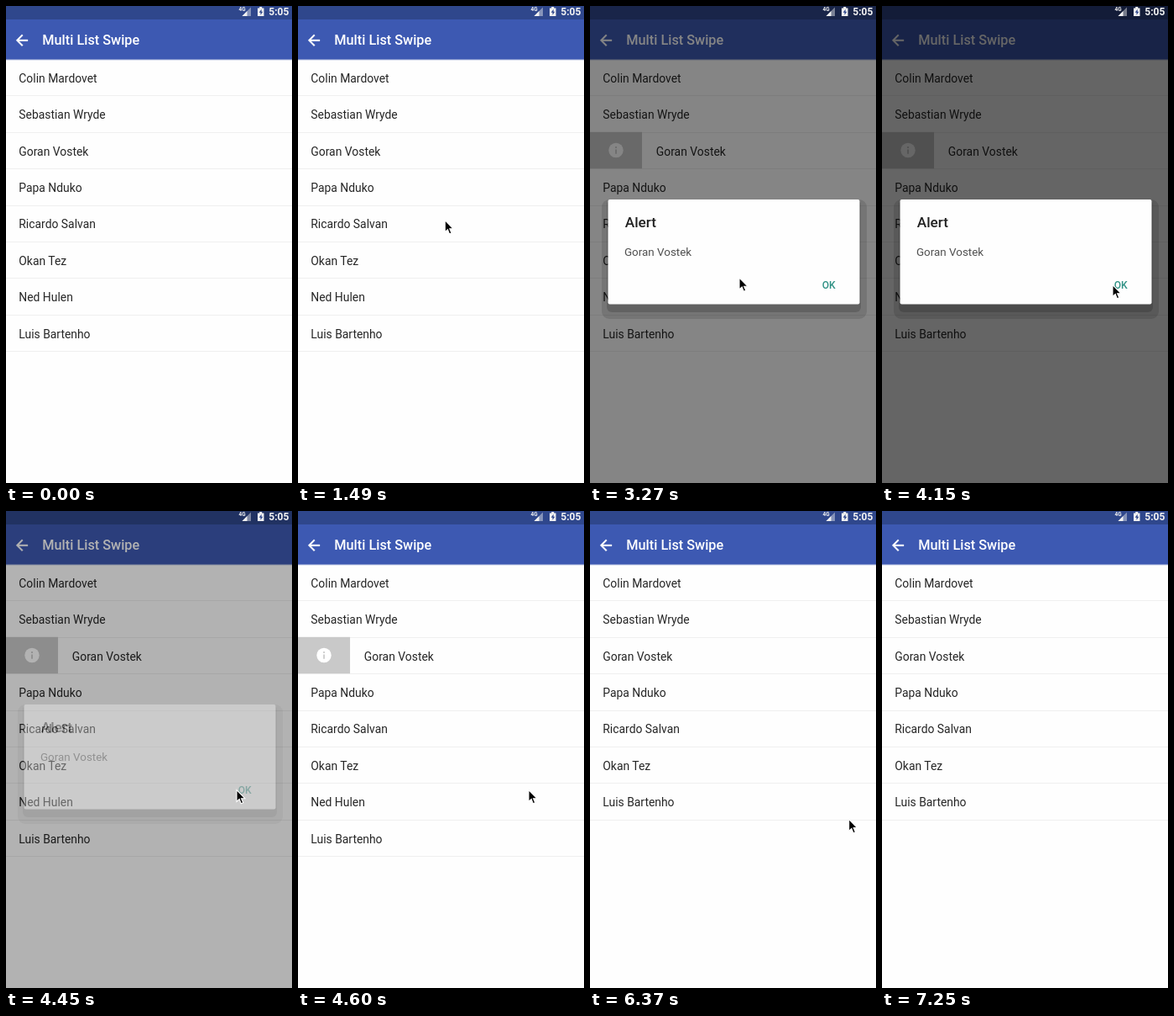
These frames come from a looping animation (341x567 px, 7.37 s). An HTML page:

```html
<!DOCTYPE html>
<html lang="en">
<head>
<meta charset="utf-8">
<title>Multi List Swipe</title>
<style>
html, body { margin: 0; width: 100%; height: 100%; overflow: hidden; background: #fefefe; }
svg { display: block; width: 341px; height: 567px; font-family: Roboto, "Noto Sans", sans-serif; }
.row { font-size: 13.9px; fill: #262626; }
.medium { font-weight: 500; }
.bold { font-weight: 700; }
</style>
</head>
<body>
<svg viewBox="0 0 341 567">
  <defs>
    <linearGradient id="fall" x2="0" y2="1">
      <stop stop-color="#3d59b2" stop-opacity=".4"/>
      <stop offset="1" stop-color="#3d59b2" stop-opacity="0"/>
    </linearGradient>
  </defs>
  <rect width="341" height="567" fill="#fefefe"/>
  <g id="list"></g>
  <rect y="63" width="341" height="2.5" fill="url(#fall)"/>
  <rect y="16" width="341" height="47.5" fill="#3d59b2"/>
  <rect width="341" height="16" fill="#2f478c"/>
  <path fill="#fff" stroke="#fff" stroke-width=".4" transform="translate(8.6 30.4) scale(.868)"
    d="M20 11H7.83l5.59-5.59L12 4l-8 8 8 8 1.41-1.41L7.83 13H20z"/>
  <text class="medium" x="43.3" y="46.3" font-size="16.3" fill="#fff">Multi List Swipe</text>
  <rect id="dim" width="341" height="567"/>
  <g fill="#f2f2f2">
    <text class="bold" x="277.5" y="6.3" font-size="6.4">4G</text>
    <path d="M281.5 12L292 1.5V12z" opacity=".45"/>
    <path d="M281.5 12l6-6v6z"/>
    <path d="M300 2.5h2.2V1h3v1.5h2.3V12H300z"/>
    <path d="M304.6 3.8l-2.9 4h1.8v3l2.8-4h-1.7z" fill="#2f478c"/>
    <text class="bold" x="313.3" y="11" font-size="12">5:05</text>
  </g>
  <g id="dialog">
    <rect x="14" y="230" width="316" height="142" rx="9" opacity=".12"/>
    <rect x="20" y="230" width="303" height="134" rx="6" opacity=".16"/>
    <rect x="21.5" y="230" width="300" height="124.5" rx="2" fill="#fefefe"/>
    <text class="medium" x="41.7" y="263" font-size="17.2" fill="#222">Alert</text>
    <text id="message" x="41" y="297" font-size="13.4" fill="#505050"></text>
    <text class="medium" x="276.7" y="335.8" font-size="12.1" fill="#2f9184">OK</text>
  </g>
  <path id="cursor" d="M0 0v14l3.2-3 2.1 5.3 2.5-1-2.2-5.1h4.3z" stroke="#fff" stroke-width="1.1"/>
</svg>
<script>
const LOOP = 7370, START = 1337, STEP = 147.75, LAST_STEP = 40;
const WIDTH = 341, ROW_TOP = 63, ROW_H = 43.4, OPEN = 63.5;
const INFO = 2, TRASH = 6;

// Moments of the interaction, counted in steps
const DRAG_INFO = 5, TAP_INFO = 11, TAP_OK = 20, DRAG_TRASH = 26, TAP_TRASH = 33;

const names = ["Colin Mardovet", "Sebastian Wryde", "Goran Vostek", "Papa Nduko",
  "Ricardo Salvan", "Okan Tez", "Ned Hulen", "Luis Bartenho"];

const $ = id => document.getElementById(id);
const ramp = (t, from, length) => Math.min(1, Math.max(0, (t - from) / length));
const easeOut = p => p * (2 - p);
const spring = t => t < 0 ? 1 : Math.exp(-1.5 * t) * Math.cos(1.2 * t);
const rowY = i => ROW_TOP + i * ROW_H;
const rowMid = i => rowY(i + .5);

const waypoints = [
  { at: 0, x: 296, y: 343 },
  { at: DRAG_INFO - 1, x: 20, y: 141 },
  { at: DRAG_INFO, x: 12, y: 165 },
  { at: DRAG_INFO + 3, x: 70, y: rowMid(INFO) },
  { at: TAP_INFO, x: 31, y: rowMid(INFO) },
  { at: TAP_INFO + 2, x: 178, y: 323 },
  { at: TAP_OK - 1, x: 275, y: 331.5 },
  { at: TAP_OK + 2, x: 275, y: 331.5 },
  { at: DRAG_TRASH, x: 325, y: rowMid(TRASH) },
  { at: DRAG_TRASH + 2, x: 278, y: 342 },
  { at: DRAG_TRASH + 4, x: 312, y: 342 },
  { at: TAP_TRASH, x: 312, y: 342 },
  { at: TAP_TRASH + 3, x: 306, y: 386 },
  { at: LAST_STEP, x: 328, y: 580 }
];

function cursorAt(step) {
  const next = Math.max(1, waypoints.findIndex(point => point.at > step));
  const a = waypoints[next - 1], b = waypoints[next];
  const p = easeOut(ramp(step, a.at, b.at - a.at));
  return [a.x + (b.x - a.x) * p, a.y + (b.y - a.y) * p];
}

function swipe(index, step) {
  if (index === INFO) return OPEN * ramp(step, DRAG_INFO, 3.2) * spring(step - DRAG_TRASH - 1);
  if (index === TRASH) return -OPEN * ramp(step, DRAG_TRASH, 3.5);
  return 0;
}

function button(y, shift) {
  const width = Math.abs(shift) - 1.3, mid = y + ROW_H / 2;
  if (width < 1.5) return "";
  const isInfo = shift > 0, left = isInfo ? 0 : WIDTH - width;
  const icon = isInfo
    ? `<circle cx="31" cy="${mid}" r="8.7" fill="#fff"/>
       <path d="M31 ${mid - 4.4}v1.8M31 ${mid - .9}v5.2" stroke="#c9c9c9" stroke-width="1.7"/>`
    : `<path transform="translate(${301.6 - left} ${mid - 10.4}) scale(.868)" fill="#fff"
       d="M6 19c0 1.1.9 2 2 2h8c1.1 0 2-.9 2-2V7H6zM19 4h-3.5l-1-1h-5l-1 1H5v2h14z"/>`;
  return `<svg x="${left}" width="${width}" height="567">
    <rect y="${y}" width="${width}" height="${ROW_H}" fill="${isInfo ? "#c9c9c9" : "#c75c54"}"/>${icon}</svg>`;
}

function row(name, place, step) {
  const y = rowY(place), shift = swipe(names.indexOf(name), step);
  return `<path d="M0 ${Math.round(y + ROW_H) + .5}h${WIDTH}" stroke="#efefef"/>${button(y, shift)}
    <text class="row" x="${15.3 + shift}" y="${y + 27.7}">${name}</text>`;
}

function render(step) {
  const shown = names.filter((_, i) => i !== TRASH || step < TAP_TRASH);
  const dim = ramp(step, TAP_INFO + .4, 2) - ramp(step, TAP_OK, 2);
  const dialog = ramp(step, TAP_INFO, 2) - ramp(step, TAP_OK, 1.5);
  $("list").innerHTML = shown.map((name, i) => row(name, i, step)).join("");
  $("dim").setAttribute("opacity", .6 * dim);
  $("dialog").setAttribute("opacity", dialog);
  $("cursor").setAttribute("transform", `translate(${cursorAt(step)})`);
  $("cursor").setAttribute("visibility", step >= 0 && step < LAST_STEP ? "visible" : "hidden");
}

$("message").textContent = names[INFO];
const began = performance.now();
let last;

function tick() {
  const time = (performance.now() - began) % LOOP;
  const step = Math.min(LAST_STEP, Math.max(-1, Math.floor((time - START) / STEP)));
  if (step !== last) render(last = step);
  requestAnimationFrame(tick);
}
tick();
</script>
</body>
</html>
```
